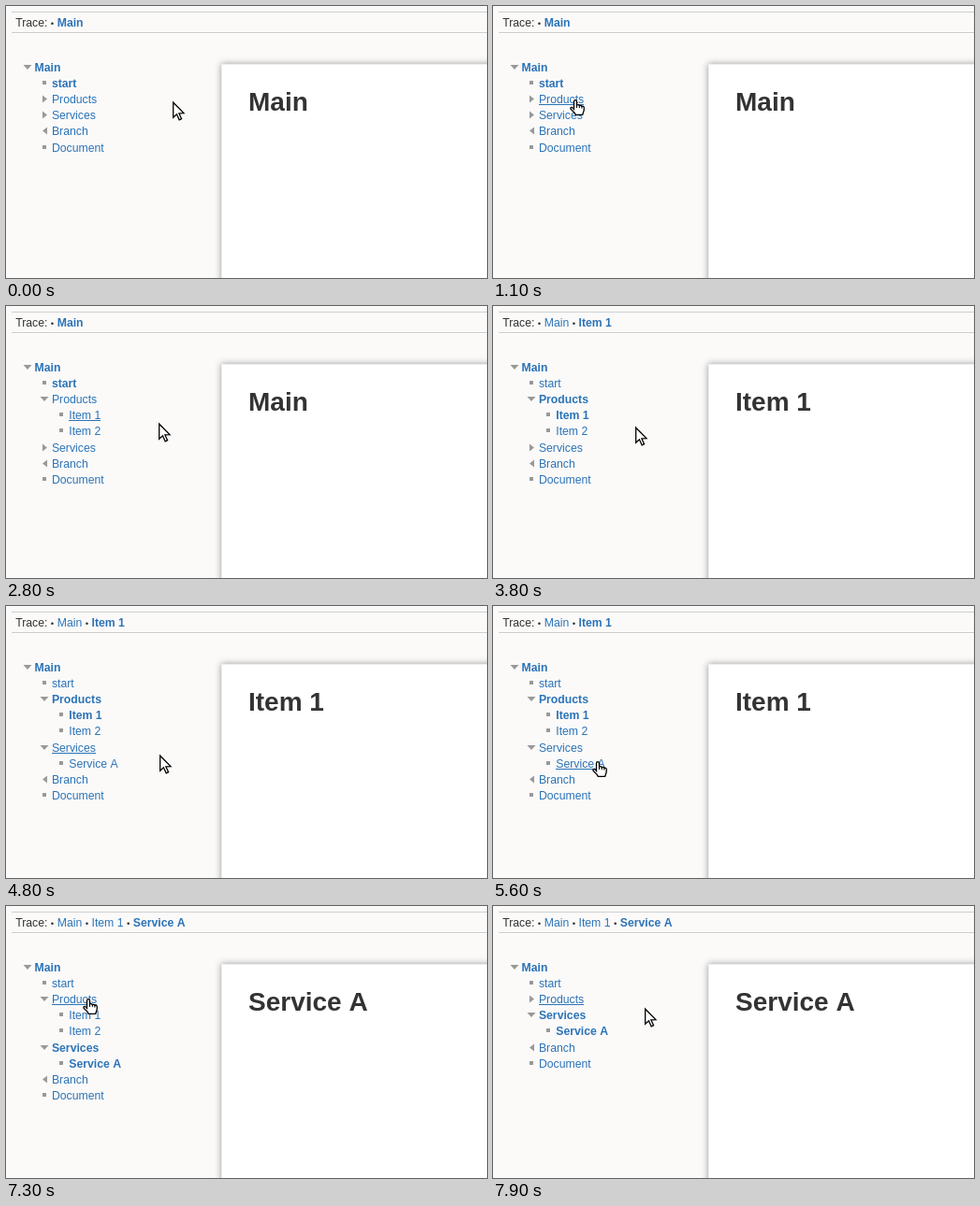
An HTML page with a canvas for the animation above (8 s loop, 514 px wide and 291 px high).

```html
<!DOCTYPE html>
<html lang="en">
<head>
<meta charset="utf-8">
<title>Navigation tree</title>
<style>
  html, body { margin: 0; width: 100%; height: 100%; overflow: hidden; background: #fbfaf9; }
  canvas { display: block; }
</style>
</head>
<body>
<canvas id="stage" width="514" height="291"></canvas>
<script>
const ctx = document.getElementById('stage').getContext('2d');
const LOOP = 8000, STEP = 100;
const LINK = '#2b73b7', TEXT = '#333', MARK = '#999';
const FAMILY = '"Liberation Sans", Arial, sans-serif';
const SIZE = 12.25, LINE = SIZE * 1.4, INDENT = SIZE * 1.5;

// Pointer moves: start, end, target x, target y
const START = [178, 102];
const MOVES = [
  [600, 1100, 88, 100],
  [1400, 1900, 118, 109],
  [1900, 2200, 158, 115],
  [2400, 2600, 92, 114],
  [2600, 2800, 163, 125],
  [3700, 3800, 152, 129],
  [3800, 4200, 94, 147],
  [4300, 4400, 91, 147],
  [4600, 4800, 164, 159],
  [5000, 5500, 100, 166],
  [5500, 5900, 177, 169],
  [5900, 6000, 179, 169],
  [6800, 7300, 88, 99],
  [7600, 7900, 162, 109]
];

// Link that keeps the focus underline: from, to, label
const FOCUS = [
  [1400, 2600, 'Products'],
  [2600, 3100, 'Item 1'],
  [4600, 5500, 'Services'],
  [5500, 6300, 'Service A'],
  [7600, LOOP, 'Products']
];

const within = (t, from, to) => t >= from && t < to;

function font(size, bold) {
  ctx.font = (bold ? 'bold ' : '') + size + 'px ' + FAMILY;
}

function write(str, x, y, color, bold, size = SIZE) {
  font(size, bold);
  ctx.fillStyle = color;
  ctx.fillText(str, x, y);
  return ctx.measureText(str).width;
}

function shape(points) {
  ctx.beginPath();
  points.forEach(([x, y]) => ctx.lineTo(x, y));
  ctx.closePath();
}

function pointerAt(t) {
  let [x, y] = START;
  for (const [from, to, toX, toY] of MOVES) {
    if (t <= from) break;
    const p = Math.min(1, (t - from) / (to - from));
    const e = p * p * (3 - 2 * p);
    x += (toX - x) * e;
    y += (toY - y) * e;
  }
  return { x: Math.round(x), y: Math.round(y) };
}

function treeAt(t) {
  const rows = [];
  const add = (level, label, mark, bold) => rows.push({ level, label, mark, bold });
  const products = within(t, 1400, 7600), services = t >= 4600;

  add(0, 'Main', 'open', true);
  add(1, 'start', 'leaf', t < 3100);
  add(1, 'Products', products ? 'open' : 'right', within(t, 3100, 6300));
  if (products) {
    add(2, 'Item 1', 'leaf', within(t, 3300, 6300));
    add(2, 'Item 2', 'leaf', false);
  }
  add(1, 'Services', services ? 'open' : 'right', t >= 6300);
  if (services) add(2, 'Service A', 'leaf', t >= 6400);
  add(1, 'Branch', 'left', false);
  add(1, 'Document', 'leaf', false);

  rows.forEach((row, i) => {
    row.x = 30.5 + row.level * INDENT;
    row.y = Math.round(69.8 + i * LINE);
    font(SIZE, row.bold);
    row.w = ctx.measureText(row.label).width;
  });
  return rows;
}

function drawMark(kind, x, y) {
  ctx.fillStyle = MARK;
  if (kind === 'leaf') {
    ctx.fillRect(x - 2, y - 7, 4, 4);
    return;
  }
  if (kind === 'open') shape([[x - 4.5, y - 7], [x + 4.5, y - 7], [x, y - 2]]);
  if (kind === 'right') shape([[x - 2, y - 8.5], [x + 3, y - 4.5], [x - 2, y - 0.5]]);
  if (kind === 'left') shape([[x + 3, y - 8.5], [x - 2, y - 4.5], [x + 3, y - 0.5]]);
  ctx.fill();
}

function drawRow(row, underlined) {
  drawMark(row.mark, Math.round(22.5 + row.level * INDENT), row.y);
  write(row.label, row.x, row.y, LINK, row.bold);
  if (underlined) ctx.fillRect(Math.round(row.x), row.y + 1, Math.round(row.w), 1);
}

function drawTrace(pages) {
  for (const y of [6, 28]) {
    ctx.fillStyle = '#ccc';
    ctx.fillRect(6, y, 508, 1);
    ctx.fillStyle = '#fff';
    ctx.fillRect(6, y + 1, 508, 1);
  }
  let x = 10.2;
  x += write('Trace: ', x, 22, TEXT);
  pages.forEach((page, i) => {
    x += write('•', x, 22, TEXT, false, SIZE * 0.8);
    x += SIZE * 0.278;
    x += write(page, x, 22, LINK, i === pages.length - 1);
    x += SIZE * 0.278;
  });
}

function drawPanel(title) {
  ctx.save();
  ctx.shadowColor = '#999';
  ctx.shadowBlur = 7;
  ctx.fillStyle = '#eee';
  ctx.fillRect(230, 62, 320, 260);
  ctx.restore();
  ctx.fillStyle = '#fff';
  ctx.fillRect(231, 63, 320, 260);
  write(title, 259, 112, TEXT, true, 28);
}

function drawArrow() {
  shape([[0.7, 1.2], [0.7, 17.3], [4.4, 13.8], [7.2, 19.8], [9.6, 18.7], [6.9, 12.9], [12, 12.6]]);
}

function drawHand() {
  ctx.translate(-6, 0);
  ctx.beginPath();
  ctx.moveTo(4.5, 10.5);
  ctx.lineTo(4.5, 2.2);
  ctx.quadraticCurveTo(4.6, 0.7, 6, 0.7);
  ctx.quadraticCurveTo(7.4, 0.7, 7.5, 2.2);
  ctx.lineTo(7.5, 6);
  ctx.quadraticCurveTo(9.5, 5, 10.3, 6.6);
  ctx.quadraticCurveTo(12.2, 5.8, 12.9, 7.4);
  ctx.quadraticCurveTo(15.3, 6.8, 15.3, 9);
  ctx.lineTo(15.2, 11.6);
  ctx.lineTo(13.7, 16.3);
  ctx.lineTo(6.2, 16.3);
  ctx.lineTo(5.2, 14.4);
  ctx.lineTo(1, 10.2);
  ctx.quadraticCurveTo(0.6, 8.2, 2.4, 8.4);
  ctx.closePath();
}

function drawPointer({ x, y }, hand) {
  ctx.save();
  ctx.translate(x, y);
  (hand ? drawHand : drawArrow)();
  ctx.fillStyle = '#fff';
  ctx.fill();
  ctx.strokeStyle = '#000';
  ctx.lineWidth = 1.3;
  ctx.stroke();
  if (hand) {
    ctx.lineWidth = 1;
    ctx.beginPath();
    for (const [lx, top, end] of [[7.5, 6, 9], [10.3, 6.6, 9.2], [12.9, 7.4, 9.6]]) {
      ctx.moveTo(lx, top);
      ctx.lineTo(lx, end);
    }
    ctx.stroke();
  }
  ctx.restore();
}

function draw(t) {
  const pages = ['Main'];
  if (t >= 3100) pages.push('Item 1');
  if (t >= 6300) pages.push('Service A');

  const rows = treeAt(t);
  const pointer = pointerAt(t);
  const hover = rows.find(r =>
    within(pointer.x, r.x, r.x + r.w) && within(pointer.y, r.y - 11, r.y + 3));
  const focus = FOCUS.find(([from, to]) => within(t, from, to));
  // A freshly loaded page shows no hover until the pointer moves
  ctx.fillStyle = '#fbfaf9';
  ctx.fillRect(0, 0, 514, 291);
  drawTrace(pages);
  drawPanel(pages[pages.length - 1]);
  rows.forEach(r => drawRow(r, r === hover || (focus && focus[2] === r.label)));
  drawPointer(pointer, !!hover);
}

function tick() {
  const t = performance.now() % LOOP;
  draw(Math.floor(t / STEP) * STEP);
  requestAnimationFrame(tick);
}
tick();
</script>
</body>
</html>
```
